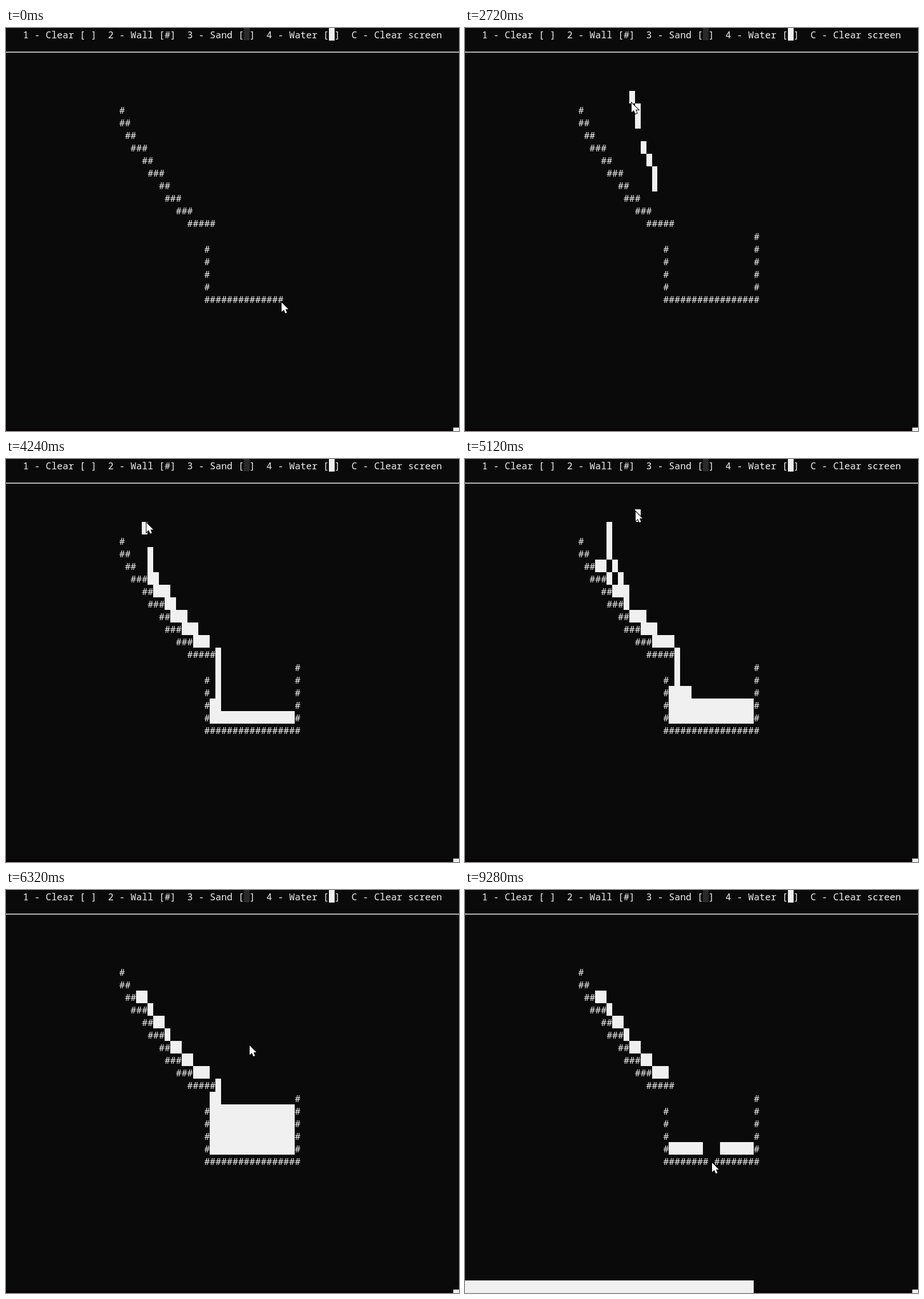
Write an HTML page with a canvas that moves like this. It is 794x705 px and loops after 9.36 s.

```html
<!DOCTYPE html>
<html>
<head>
<meta charset="utf-8">
<style>
html, body { margin: 0; width: 100%; height: 100%; overflow: hidden; background: #0a0a0a; }
canvas { display: block; }
</style>
</head>
<body>
<canvas id="stage" width="794" height="705"></canvas>
<script>
const ctx = document.getElementById('stage').getContext('2d');
const COLS = 80, ROWS = 32, W = 794 / COLS, H = 705 / ROWS;
const LOOP = 9360, FRAME = 80, INK = '#f0f0f0', BACK = '#0a0a0a';
const EMPTY = 0, WALL = 1, WATER = 2;
const MENU = '   1 - Clear [ ]  2 - Wall [#]  3 - Sand [ ]  4 - Water [ ]  C - Clear screen';

const WALL_END = 960, POUR_START = 2440, DROPS = 76, HOLE = 6480, DRAINED = 7200;
const RAMP = [20, 20, 21, 22, 24, 25, 27, 28, 30, 32, 36]; // column where each row hands over to the next

// Mouse path: time, x, y
const PATH = [
  [0, 483, 480], [480, 512, 480], [WALL_END, 512, 362], [1760, 429, 152],
  [POUR_START, 335, 130], [2960, 255, 132], [3120, 325, 133], [3280, 335, 133], [3360, 293, 133],
  [4300, 243, 110], [4900, 275, 94], [5000, 252, 92], [5080, 252, 92], [5120, 299, 92],
  [5960, 300, 95], [6320, 427, 272], [HOLE, 433, 477]
];

let grid, clock, ticks, drops;

function reset() {
  grid = Array.from({ length: ROWS }, () => new Array(COLS).fill(EMPTY));
  clock = ticks = drops = 0;
  for (let i = 1; i < RAMP.length; i++) grid[i + 5].fill(WALL, RAMP[i - 1], RAMP[i] + 1);
  for (let y = 17; y < 21; y++) grid[y][35] = WALL;
  grid[21].fill(WALL, 35, 49);
}

function mouse(t) {
  const i = PATH.findIndex(p => p[0] > t);
  if (i < 0) return PATH[PATH.length - 1].slice(1);
  const [t0, x0, y0] = PATH[i - 1], [t1, x1, y1] = PATH[i];
  const k = (t - t0) / (t1 - t0);
  return [x0 + (x1 - x0) * k, y0 + (y1 - y0) * k];
}

// Column in the row below that water at (x, y) can reach, or -1.
function outlet(x, y) {
  const below = grid[y + 1];
  for (const c of [x, x - 1, x + 1]) if (below[c] === EMPTY) return c;
  if (below[x] !== WATER) return -1;
  for (const dir of [-1, 1]) {
    let c = x;
    while (below[c] === WATER) c += dir;
    if (below[c] === EMPTY) return c;
  }
  return -1;
}

function flow() {
  for (let y = ROWS - 2; y > 1; y--)
    for (let x = COLS - 1; x >= 0; x--) {
      if (grid[y][x] !== WATER) continue;
      const c = outlet(x, y);
      if (c < 0) continue;
      grid[y][x] = EMPTY;
      grid[y + 1][c] = WATER;
    }
}

function paint() {
  const [mx, my] = mouse(clock);
  const x = Math.floor(mx / W), y = Math.floor(my / H);
  const pouring = clock >= POUR_START && drops < DROPS && ticks % 8 !== 1;
  if (clock <= WALL_END) grid[y][x] = WALL;
  else if (pouring && grid[y][x] === EMPTY) {
    grid[y][x] = WATER;
    drops++;
  } else if (clock === HOLE) grid[y][x] = EMPTY;
}

function advance(t) {
  if (t < clock) reset();
  for (;;) {
    const step = clock < HOLE ? 40 : clock < DRAINED ? 16 : 45;
    if (clock + step > t) return;
    clock += step;
    ticks++;
    flow();
    paint();
  }
}

function glyph(char, x, y) {
  ctx.fillText(char, x * W, Math.round(y * H) + 18);
}

function block(x, y) {
  const left = Math.round(x * W), top = Math.round(y * H);
  ctx.fillRect(left, top, Math.round((x + 1) * W) - left, Math.round((y + 1) * H) - top);
}

function arrow(x, y) {
  ctx.save();
  ctx.translate(x, y);
  ctx.beginPath();
  for (const p of [[0, 0], [0, 16.5], [4, 13], [6.5, 19], [9.5, 18], [7, 12], [12, 12]]) ctx.lineTo(...p);
  ctx.closePath();
  ctx.strokeStyle = '#000';
  ctx.lineWidth = 2;
  ctx.stroke();
  ctx.fillStyle = '#fff';
  ctx.fill();
  ctx.restore();
}

function draw(t) {
  ctx.fillStyle = BACK;
  ctx.fillRect(0, 0, 794, 705);
  ctx.fillStyle = '#0b0003';
  ctx.fillRect(0, 701, 794, 4);
  ctx.fillStyle = '#888';
  for (let y = 0; y < 22; y += 2)
    for (let x = 417 + y / 2 % 2; x < 427; x += 2) ctx.fillRect(x, y, 1, 1);

  ctx.fillStyle = INK;
  ctx.font = '500 16.54px "Noto Sans Mono", "DejaVu Sans Mono", monospace';
  [...MENU].forEach((char, x) => glyph(char, x, 0));
  block(57, 0);
  ctx.fillRect(0, 41.5, 794, 1.5);
  ctx.fillRect(784, 699, 10, 6);

  grid.forEach((row, y) => row.forEach((cell, x) => {
    if (cell === WALL) glyph('#', x, y);
    if (cell === WATER) block(x, y);
  }));
  arrow(...mouse(t));
}

function frame() {
  const t = Math.floor(performance.now() % LOOP / FRAME) * FRAME;
  advance(t);
  draw(t);
  requestAnimationFrame(frame);
}

reset();
frame();
</script>
</body>
</html>
```
